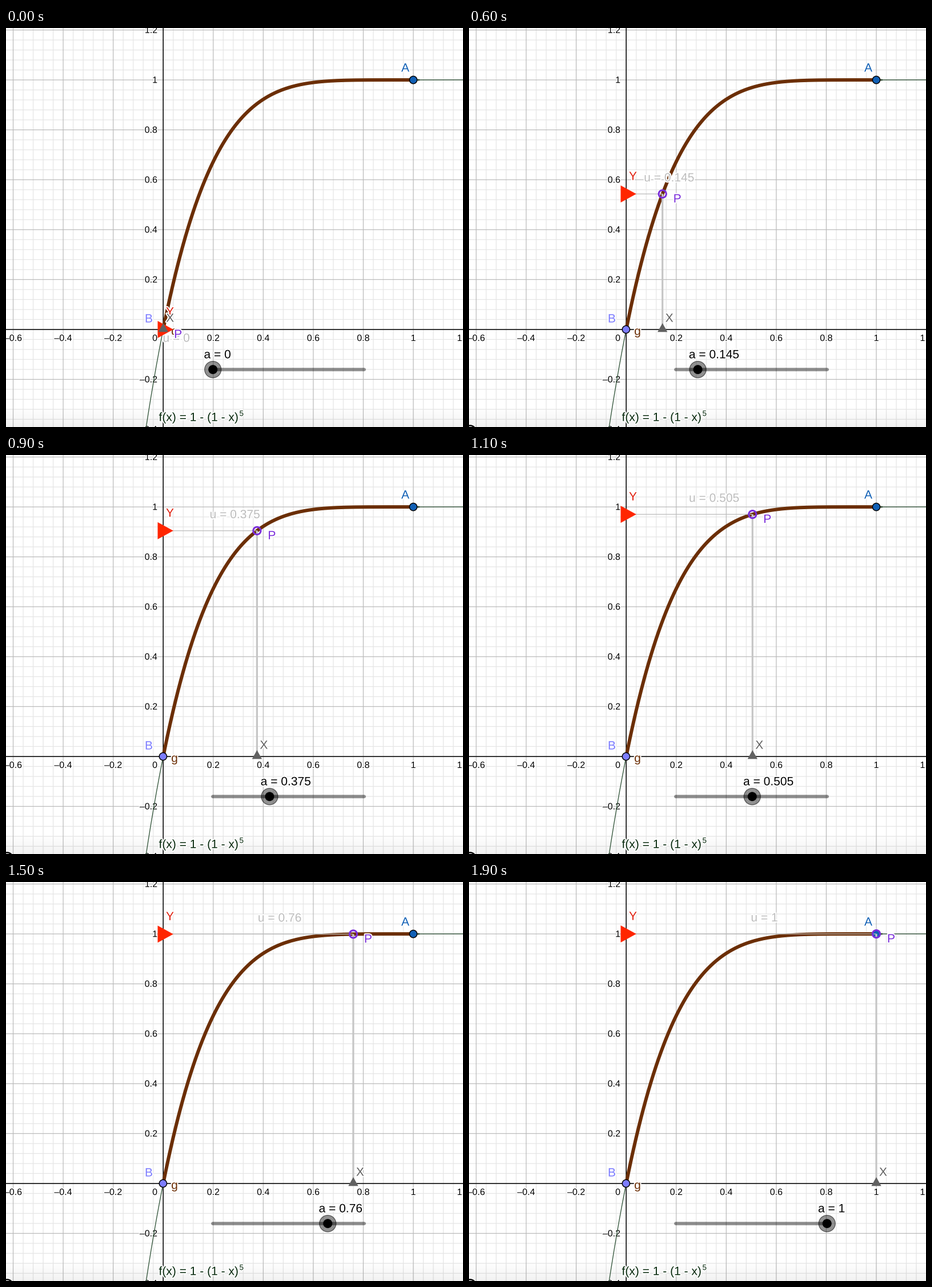
Write a matplotlib script that moves like this. It is 800 by 700 pixels and loops after 2000 ms.

```python
import numpy as np
import matplotlib.pyplot as plt
from matplotlib.animation import FuncAnimation
from matplotlib.patches import Circle, Polygon
from matplotlib.patheffects import withStroke

W, H, DPI = 800, 700, 100
PT = 72 / DPI                      # points per pixel
X0, Y0, UNIT = 275.2, 528.9, 437.8   # origin and scale in pixels
FRAMES, STEP = 20, 100

BROWN = "#6b2e05"
GREEN = "#06280c"
BLUE = "#1160b5"
LILAC = "#7d7dff"
PURPLE = "#7b2ddb"
RED = "#ff2600"
DARK = "#616161"
PALE = "#bdbdbd"

plt.rcParams["font.family"] = "Liberation Sans"
fig = plt.figure(figsize=(W / DPI, H / DPI), dpi=DPI, facecolor="white")
ax = fig.add_axes([0, 0, 1, 1])
ax.axis("off")


def px(x):
    return X0 + UNIT * x


def py(y):
    return Y0 - UNIT * y


def curve(x):
    return 1 - (1 - x) ** 5


def line(xs, ys, color, width, z, cap="butt"):
    return ax.plot(xs, ys, color=color, lw=width * PT, zorder=z,
                   solid_capstyle=cap, snap=False)[0]


def label(x, y, text, color, z, size=21, ha="left", halo=4):
    """Text whose capitals are centred on y."""
    return ax.text(x, y + 0.358 * size, text, color=color, fontsize=size * PT,
                   ha=ha, va="baseline", zorder=z,
                   path_effects=[withStroke(linewidth=halo * PT, foreground="white")])


def dot(x, y, r, z, face, edge="black", width=1.5):
    return ax.add_patch(Circle((x, y), r, fc=face, ec=edge, lw=width * PT, zorder=z))


def triangle(color, z):
    return ax.add_patch(Polygon(np.zeros((3, 2)), fc=color, ec="none", zorder=z))


def number(v):
    return f"{v:g}".replace("-", "\u2013")


# Grid, axes and tick labels
for k in range(-20, 36):
    major = k % 5 == 0
    shade, z = ("#b9b9b9", 1.1) if major else ("#e5e5e5", 1)
    line([px(k / 25)] * 2, [0, H], shade, 1.2, z)
    line([0, W], [py(k / 25)] * 2, shade, 1.2, z)

fade = np.zeros((40, 1, 4))
fade[:, 0, 3] = np.linspace(0, 0.055, 40)
ax.imshow(fade, extent=(0, W, H, 664), aspect="auto", zorder=1.5)

line([X0, X0], [0, H], "black", 1.5, 2)
line([0, W], [Y0, Y0], "black", 1.5, 2)
for k in range(-3, 7):
    v = k / 5
    if k:
        label(px(v), 543.3, number(v), "black", 2.2, 16, "center", 3)
        if k >= -2:
            label(265, py(v) - 0.5, number(v), "black", 2.2, 16, "right", 3)
label(265, 543.3, "0", "black", 2.2, 16, "right", 3)

# Function and highlighted arc
t = np.linspace(-0.12, 1.25, 500)
line(px(t), py(curve(t)), "#2f5237", 1.3, 3)
t = np.linspace(0, 1, 300)
line(px(t), py(curve(t)), BROWN, 6, 3.2)
line([px(1), px(1) + 10], [py(1)] * 2, "#2f4a33", 2.6, 3.1, "round")
label(267.5, 682, "f(x) = 1 - (1 - x)", GREEN, 3.3)
label(408.5, 675.7, "5", GREEN, 3.3, 13.5, halo=3)
label(295, 531, "g", BROWN, 3.4, ha="center")

# Fixed points
dot(px(1), py(1), 6.6, 3.6, BLUE)
label(699, 69, "A", BLUE, 3.6, ha="center")
dot(X0 - 0.3, Y0, 6.6, 3.6, LILAC)
label(250, 509, "B", LILAC, 3.6, ha="center")

# Moving construction
drop = line([], [], "#c6c6c6", 3.2, 4)
across = line([], [], PALE, 1.3, 4)
u_text = label(0, 0, "", PALE, 4.2)
ring = dot(0, 0, 6.6, 4.4, "none", PURPLE, 3)
p_text = label(0, 0, "P", PURPLE, 4.5, ha="center")
y_mark = triangle(RED, 4.6)
y_text = label(287, 0, "Y", "#e0200f", 4.7, ha="center")
x_mark = triangle(DARK, 4.8)
x_text = label(0, 508, "X", DARK, 4.9, ha="center")

# Slider
line([362, 627], [599.2, 599.2], (0, 0, 0, 0.43), 6, 5, "round")
knob = dot(362, 599.2, 14.5, 5.1, (0, 0, 0, 0.43), (0, 0, 0, 0.55), 1.3)
core = dot(362, 599.2, 8, 5.2, "black", "none", 0)
a_text = label(0, 571.9, "", "black", 5.3)

corner = dot(2, 707.5, 10, 6, "none", "black", 2.5)

ax.set_xlim(0, W)
ax.set_ylim(H, 0)


def value(i):
    """Rest, speed up, then run almost steadily to 1, in steps of 0.005."""
    v = np.interp(i, [3, 4, 5, 6, 9, 11, 15, 18, 19],
                  [0, 0.04, 0.09, 0.145, 0.375, 0.505, 0.76, 0.95, 1])
    return round(v * 200) / 200


def shift(text, x, y):
    text.set_position((x, y + 0.358 * 21))


def update(i):
    a = value(i)
    x, y = px(a), py(curve(a))

    drop.set_data([x, x], [Y0, y])
    across.set_data([X0, x], [y, y])
    ring.center = x, y
    shift(p_text, x + 26, y + 7.4)

    u_text.set_text(f"u = {a:g}")
    shift(u_text, X0 + UNIT * a / 2 - 0.7, y - 29.5 if a else 543)

    y_mark.set_xy([(265.5, y - 15), (265.5, y + 15), (292.8, y)])
    shift(y_text, 287, y - 32)
    x_mark.set_xy([(x - 8.7, 533.3), (x + 8.7, 533.3), (x, 517.8)])
    shift(x_text, x + 12, 508)

    k = 362.2 + 264.5 * a
    knob.center = core.center = k, 599.2
    a_text.set_text(f"a = {a:g}")
    shift(a_text, k - 15.7, 571.9)
    corner.set_visible(a > 0)
    return []


anim = FuncAnimation(fig, update, frames=FRAMES, interval=STEP,
                     init_func=lambda: update(0), repeat=True)
plt.show()
```
